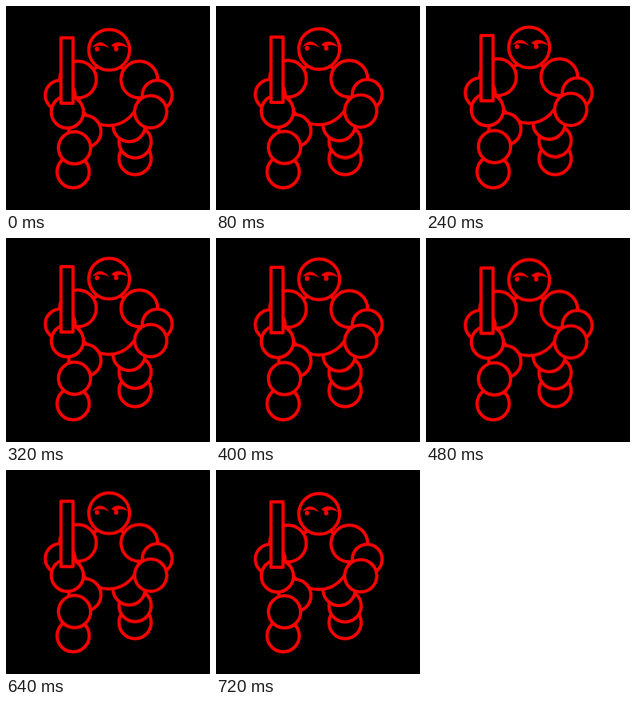
An HTML page that plays this animation: 256 by 256 pixels, repeating every 800 ms.

```html
<!DOCTYPE html>
<html lang="en">
<head>
<meta charset="utf-8">
<title>Idle stance</title>
<style>
  html, body { margin: 0; width: 100%; height: 100%; overflow: hidden; background: #000; }
  svg { display: block; width: 100vw; height: 100vh; }
  .line { fill: #000; stroke: #f00; stroke-width: 4; stroke-linejoin: round; }
  .face { fill: #f00; stroke: none; }
  .torso, .knee { animation: bob 800ms infinite; }
  .torso { --lift: -4px; }
  .knee { --lift: -2px; }
  /* Four even steps up, five down, then a short rest. */
  @keyframes bob {
    0% { transform: translateY(0); animation-timing-function: steps(4, end); }
    40% { transform: translateY(var(--lift)); animation-timing-function: steps(5, end); }
    90%, 100% { transform: translateY(0); }
  }
</style>
</head>
<body>
<svg viewBox="0 0 256 256">
  <g class="line">
    <circle cx="162" cy="191.5" r="20.2"/>
    <circle class="knee" cx="162" cy="170.5" r="20.2"/>
    <circle cx="84.3" cy="208" r="20.2"/>

    <g class="torso">
      <circle cx="154.5" cy="150" r="20.2"/>
      <circle cx="129" cy="112" r="38"/>
      <circle cx="99" cy="157.5" r="20.2"/>
      <circle cx="167.3" cy="92.3" r="23"/>
      <circle cx="189.8" cy="112" r="18.7"/>
      <circle cx="181.6" cy="132.8" r="20.2"/>
      <circle cx="90.3" cy="92.3" r="23"/>
      <circle cx="68" cy="112" r="18.7"/>
      <circle cx="77" cy="133" r="20.2"/>
      <rect x="69" y="40" width="15.2" height="82"/>
      <circle cx="129.5" cy="55" r="25.6"/>
      <g class="face">
        <path d="M108.5 52Q118 38.500 129.500 53Q120 47 108.500 52Z"/>
        <path d="M132 49.500Q142 40 154 52.500Q143 47.500 137 52.500Z"/>
        <ellipse cx="114.300" cy="54" rx="2.800" ry="3"/>
        <ellipse cx="138.300" cy="54" rx="2.800" ry="3"/>
      </g>
    </g>

    <circle class="knee" cx="86" cy="178" r="20.2"/>
  </g>
</svg>
</body>
</html>
```
